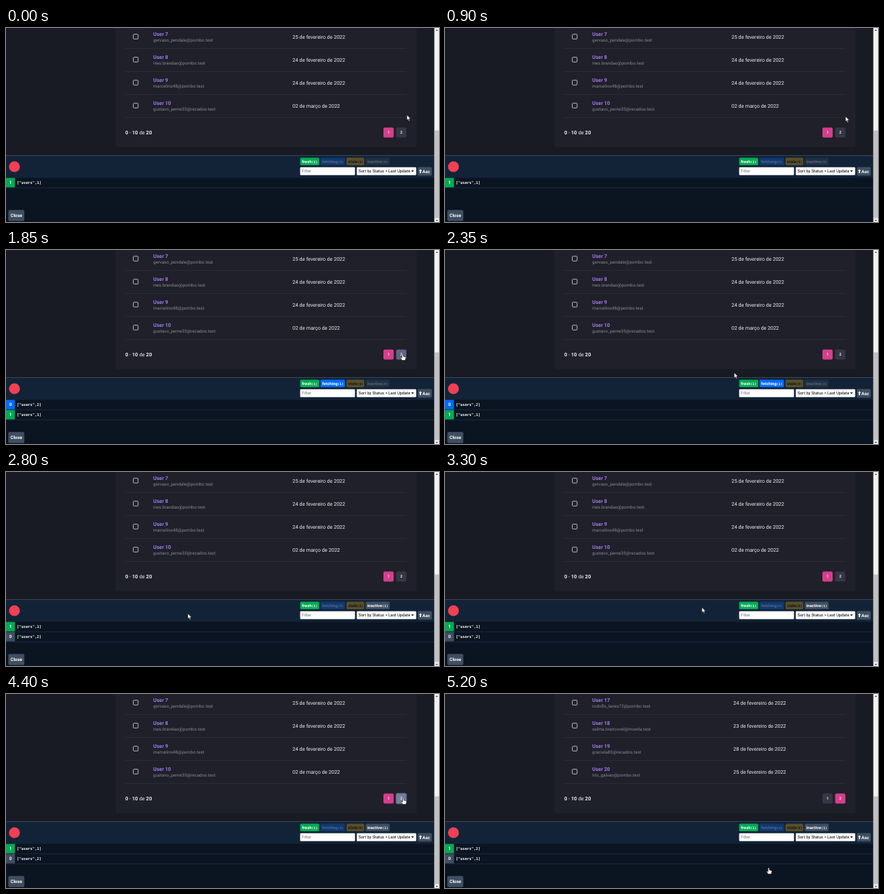
Write an HTML page that moves like this. It is 600 by 270 pixels and loops after 5.25 s.

```html
<!DOCTYPE html>
<html lang="pt">
<head>
<meta charset="utf-8">
<style>
  html, body { margin: 0; width: 100%; height: 100%; overflow: hidden; background: #181b23; }
  svg { display: block; width: 600px; height: 270px; }
  text { font-family: Roboto, sans-serif; text-rendering: geometricPrecision; white-space: pre; }
  .b { font-weight: 700; }
  .mono { font-family: "DejaVu Sans Mono", monospace; font-weight: 700; }
</style>
</head>
<body>
<svg id="stage" viewBox="0 0 600 270"></svg>
<script>
const LOOP = 5250, STEP = 50;
const FETCH = 1750, FETCHED = 2500, PRESS = 4350, CLICK = 4500;
const GREEN = '#00ab52', BLUE = '#006bff', GRAY = '#3f4e60', YELLOW = '#ffb200';
const PINK = '#d53f8c', BUTTON = '#353646';

const pages = [
  { first: 7, dateX: 397, users: [
    ['gervaso_pendale@pombo.test', '25 de fevereiro de 2022'],
    ['ines.brandao@pombo.test', '24 de fevereiro de 2022'],
    ['marcelino48@pombo.test', '24 de fevereiro de 2022'],
    ['gustavo_perne35@recados.test', '02 de março de 2022']] },
  { first: 17, dateX: 399.6, users: [
    ['rodolfo_lanes72@pombo.test', '24 de fevereiro de 2022'],
    ['selma.brancovel@moeda.test', '23 de fevereiro de 2022'],
    ['graciela83@recados.test', '28 de fevereiro de 2022'],
    ['tito_galvao@pombo.test', '25 de fevereiro de 2022']] }
];

// Pointer path: time, x, y
const path = [
  [0, 555.5, 121], [900, 555, 123], [1350, 555, 124], [1700, 549.5, 144.5],
  [2000, 549.5, 144.5], [2700, 252, 197], [3000, 252, 197], [3750, 547.5, 172.5],
  [4100, 550.5, 144.5], [4700, 550.5, 144.5], [5200, 448.5, 241.5], [5250, 448.5, 241.5]
];

const rect = (x, y, w, h, fill, r = 0, more = '') =>
  `<rect x="${x}" y="${y}" width="${w}" height="${h}" rx="${r}" fill="${fill}" ${more}/>`;
const text = (x, y, size, fill, str, cls = '', anchor = 'start') =>
  `<text x="${x}" y="${y}" font-size="${size}" fill="${fill}" class="${cls}" text-anchor="${anchor}">${str}</text>`;
const shape = (d, fill, more = '') => `<path d="${d}" fill="${fill}" ${more}/>`;

function pointerAt(t) {
  const i = path.findIndex((k, n) => n && t <= k[0]);
  const [t0, x0, y0] = path[i - 1], [t1, x1, y1] = path[i];
  const p = (t - t0) / (t1 - t0), e = p * p * (3 - 2 * p);
  return [x0 + (x1 - x0) * e, y0 + (y1 - y0) * e];
}

function table(page) {
  const rows = page.users.map(([mail, date], i) => {
    const y = 12 + 32 * i;
    return rect(176.4, y - 3.3, 6.6, 6.6, 'none', 1, 'stroke="#c4c5d0" stroke-width=".9"') +
      text(204, y - 1.4, 7.1, '#9f7aea', 'User ' + (page.first + i), 'b') +
      text(204, y + 6.9, 6.14, '#858795', mail) +
      text(page.dateX, y + 3, 7, '#eeeef2', date) +
      rect(165, y + 16, 390, .9, '#2c2d38');
  }).join('');
  return rect(151.5, -10, 417.5, 176, '#1f2029', 3.5) + rows +
    text(165.3, 147.7, 7.05, '#eeeef2',
      '<tspan class="b">0</tspan> - <tspan class="b">10</tspan> de <tspan class="b">20</tspan>');
}

function pageButton(n, x, fill, ring) {
  return rect(x, 138.4, 14.2, 14.2, fill, 2, ring ? 'stroke="#506f94" stroke-width="1.2"' : '') +
    text(x + 7.1, 147.4, 5.3, '#eeeef2', n, 'b', 'middle');
}

function tag(x, w, fill, label, count, color = '#fff') {
  return `<g opacity="${count ? 1 : .3}">` + rect(x, 180.4, w, 10.6, fill, 1.5) +
    text(x + 2.3, 187.5, 5.8, color,
      `${label}<tspan class="mono" font-size="4.6">(${count})</tspan>`, 'b') + '</g>';
}

function queryRow([count, fill, page], i) {
  const y = 208.6 + 14 * i;
  return rect(0, y, 12.4, 13.2, fill) + text(6.2, y + 8.6, 6.2, '#fff', count, 'b', 'middle') +
    text(15, y + 8.3, 5.15, '#fff', `["users",${page}]`, 'mono') +
    rect(0, y + 13.3, 593.5, .7, '#222e51');
}

function devtools(t) {
  const fetching = t >= FETCH && t < FETCHED, cached = t >= FETCHED;
  const active = t >= CLICK ? 2 : 1;
  const rows = [[1, GREEN, active]];
  if (fetching) rows.unshift([0, BLUE, 2]);
  if (cached) rows.push([0, GRAY, 3 - active]);
  return rect(0, 177, 593.5, 93, '#0b1521') + rect(0, 177, 593.5, 31.5, '#132337') +
    rect(0, 177, 593.5, .8, GRAY) +
    '<circle cx="11.7" cy="193" r="7.6" fill="#ef4054"/>' +
    tag(407.6, 26.4, GREEN, 'fresh', 1) +
    tag(435.8, 34, BLUE, 'fetching', +fetching) +
    tag(471.8, 24.6, YELLOW, 'stale', 0, '#000') +
    tag(498.4, 33.2, GRAY, 'inactive', +cached) +
    rect(407.6, 193.8, 76, 11, '#fff', 1) + text(410, 201.2, 5.8, '#757575', 'Filter') +
    rect(486, 193.8, 82.4, 11, '#fff', 1) +
    text(488.5, 201.2, 5.7, '#000', 'Sort by Status &gt; Last Update') +
    shape('M561.3 198.2h4l-2 2.3z', '#111') +
    rect(570.6, 193.6, 19.4, 11.8, GRAY, 1.5) +
    shape('M574.3 196.5l2 2.4h-1.2v3h-1.6v-3h-1.2z', '#fff') +
    text(577, 201.5, 6.2, '#fff', 'Asc', 'b') +
    rows.map(queryRow).join('') +
    rect(3.2, 253.2, 22.2, 15.6, GRAY, 1.8) + text(14.3, 263.2, 6.3, '#fff', 'Close', 'b', 'middle');
}

const scrollbar = rect(593.5, 0, 6.5, 270, '#f1f1f1') + rect(594, 142.5, 6, 122, '#c1c1c1') +
  shape('M595.3 4h3.4l-1.7-2z', '#505050') + shape('M595.3 267h3.4l-1.7 2z', '#505050');

function pointer(x, y, hand) {
  const d = hand
    ? 'M-.8 .8Q0-.4 .8 .8V3.4L3.6 4.2Q4.6 4.6 4.4 5.8L3.6 9H-.6L-2.7 5.9Q-2.7 4.7-1.6 5.2L-.8 6z'
    : 'M0 0V7.2L1.7 5.7 2.8 8.4 4 7.9 2.9 5.3H5.1z';
  return `<g transform="translate(${x} ${y})">` +
    shape(d, '#fff', 'stroke="#111" stroke-width=".5"') + '</g>';
}

function draw(t) {
  const [x, y] = pointerAt(t), second = t >= CLICK;
  const over = x > 540.6 && x < 554.8 && y > 138.4 && y < 152.6;
  const pressed = t >= PRESS && !second;
  const fill = second ? PINK : pressed ? '#797d9a' : over ? '#616480' : BUTTON;
  return rect(0, 0, 600, 270, '#181b23') + table(pages[+second]) +
    pageButton(1, 523, second ? BUTTON : PINK) + pageButton(2, 540.6, fill, pressed) +
    devtools(t) + scrollbar + pointer(x, y, over || second);
}

const stage = document.getElementById('stage');
const start = performance.now();
let shown = -1;
function tick() {
  const t = Math.floor((performance.now() - start) % LOOP / STEP) * STEP;
  if (t !== shown) stage.innerHTML = draw(shown = t);
  requestAnimationFrame(tick);
}
tick();
</script>
</body>
</html>
```
